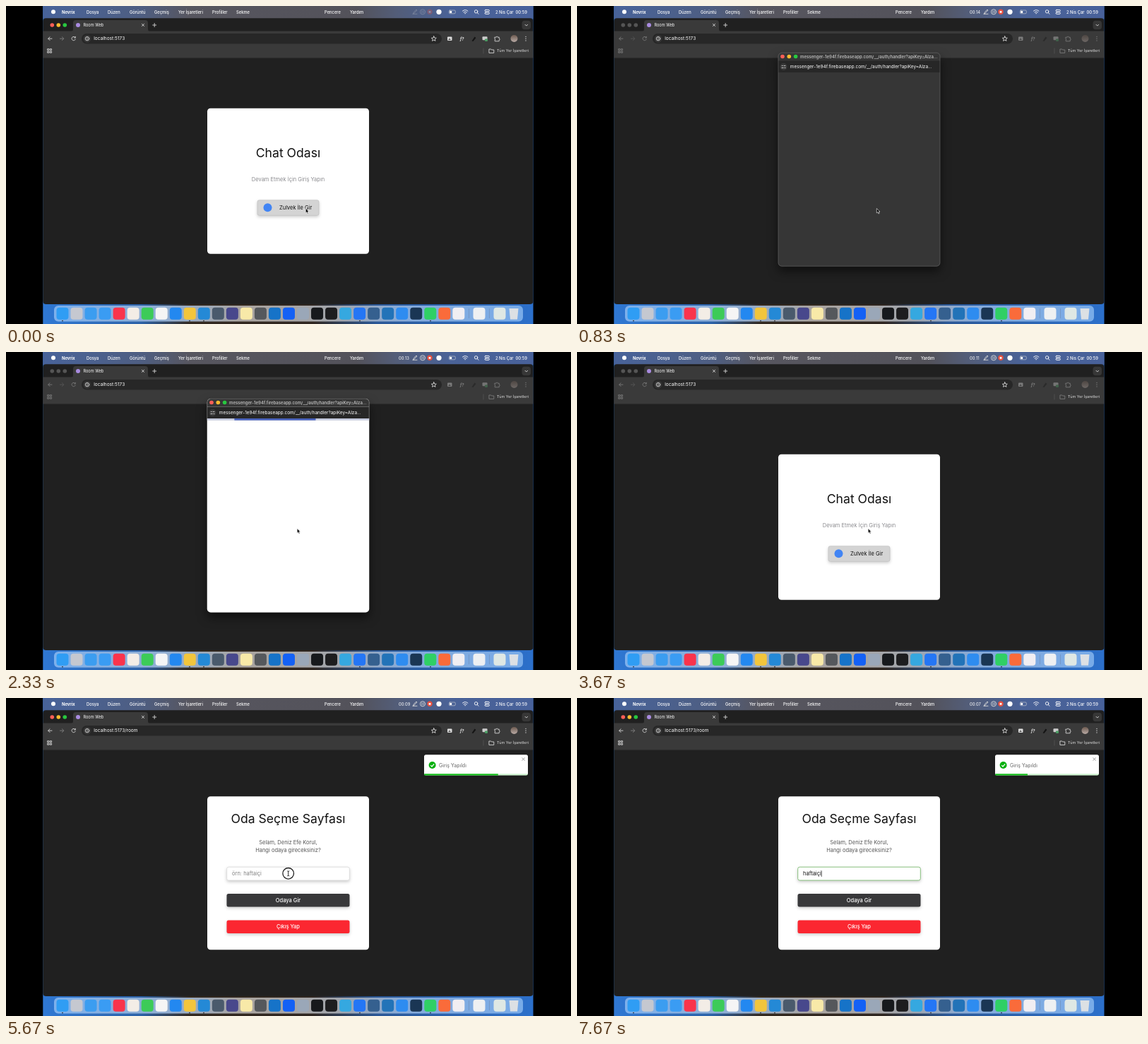
Animation of 800 by 450 pixels, one loop 8 s. Source, as an HTML page:

```html
<!DOCTYPE html>
<html lang="tr">
<head>
<meta charset="utf-8">
<title>Oda</title>
<style>
  html, body { margin: 0; width: 100%; height: 100%; overflow: hidden; background: #000; }
  svg { display: block; width: 100vw; height: 100vh; }
  text { font-family: Inter, Roboto, sans-serif; font-size: 5.8px; fill: #fff; white-space: pre; }
  .mid { text-anchor: middle; }
  .h1 { font-size: 17.6px; fill: #111; }
  .body { font-size: 7.5px; fill: #555; }
  .line { fill: none; stroke: #d6d6d6; stroke-width: .9; stroke-linecap: round; stroke-linejoin: round; }
  .card { fill: #fff; }
  .soft { filter: drop-shadow(0 2px 2px #0003); }
  .inactive .tools { opacity: .4; }
  .inactive .lights circle { fill: #555; }
</style>
</head>
<body>
<svg viewBox="0 0 800 450" preserveAspectRatio="none">
  <defs>
    <linearGradient id="bar">
      <stop offset="0" stop-color="#48639a"/><stop offset=".2" stop-color="#4e5e82"/>
      <stop offset=".3" stop-color="#57565f"/><stop offset=".64" stop-color="#53525a"/>
      <stop offset=".72" stop-color="#535d78"/>
      <stop offset=".83" stop-color="#4a6297"/><stop offset="1" stop-color="#48619a"/>
    </linearGradient>
    <linearGradient id="desk">
      <stop offset="0" stop-color="#2f78d4"/><stop offset=".2" stop-color="#2c62a8"/>
      <stop offset=".3" stop-color="#33291f"/><stop offset=".55" stop-color="#2f2620"/>
      <stop offset=".68" stop-color="#2a5796"/><stop offset="1" stop-color="#2c70cb"/>
    </linearGradient>
    <linearGradient id="dockFill">
      <stop offset="0" stop-color="#7db0ec"/><stop offset=".25" stop-color="#93aed0"/>
      <stop offset=".4" stop-color="#aaa49f"/><stop offset=".6" stop-color="#a2a5ab"/>
      <stop offset=".75" stop-color="#86abdb"/><stop offset="1" stop-color="#78abe8"/>
    </linearGradient>
    <linearGradient id="face" x2="0" y2="1">
      <stop offset="0" stop-color="#6d5a50"/><stop offset="1" stop-color="#b9aaa5"/>
    </linearGradient>
    <clipPath id="screen"><rect x="52.3" width="694.2" height="450"/></clipPath>
    <clipPath id="popClip"><rect x="284.800" y="66" width="229.400" height="302.400" rx="5"/></clipPath>
  </defs>

  <g clip-path="url(#screen)">
    <rect x="52" width="695" height="450" fill="url(#desk)"/>
    <rect x="52" width="695" height="18" fill="url(#bar)"/>
    <g id="menu"><circle cx="67" cy="8.3" r="3" fill="#fff"/></g>

    <!-- status icons -->
    <g id="recorder">
      <path class="line" d="M576.5 11l1-2.5 3.5-3.5 1 1-3.5 3.5zM576 11.3h6"/>
      <circle class="line" cx="590" cy="8.3" r="3.6"/><path class="line" d="M588.9 6.8v3M591.1 6.8v3"/>
      <circle cx="600" cy="8.3" r="3.7" fill="#e8503f"/><rect x="598.6" y="6.9" width="2.8" height="2.8" rx=".5" fill="#fff"/>
    </g>
    <text id="timer" x="556" y="10.7"></text>
    <circle cx="613" cy="8.3" r="3.6" fill="#fff"/>
    <rect class="line" x="627.3" y="6" width="9" height="4.8" rx="1.4" style="stroke-width:.6"/>
    <rect x="628.2" y="6.9" width="3" height="3" rx=".6" fill="#fff"/>
    <path class="line" style="stroke:#fff" d="M646.5 7.1q3.7-3.2 7.4 0M648 8.9q2.2-1.8 4.4 0M649.7 10.6h1"/>
    <g class="line" style="stroke:#fff"><circle cx="665.6" cy="7.8" r="2.2"/><path d="M667.3 9.5l1.8 1.8"/>
      <rect x="678" y="5.4" width="6.4" height="2.4" rx="1.2"/><rect x="678" y="9" width="6.4" height="2.4" rx="1.2"/></g>

    <!-- browser window -->
    <g id="browser">
      <path d="M52 22q0-4.700 4.700-4.700H742q4.700 0 4.700 4.700V417q0 5-5 5H57q-5 0-5-5z" fill="#202020"/>
      <path d="M92 36q3 0 3-3v-9q0-4 4-4h98q4 0 4 4v9q0 3 3 3z" fill="#3a3a3a"/>
      <rect x="52" y="35.5" width="695" height="37.2" fill="#3a3a3a"/>
      <path d="M52 73H747" stroke="#4a4a4a" stroke-width=".6"/>
      <g class="lights"><circle cx="65.3" cy="27" r="2.8" fill="#ff5f57"/><circle cx="74.3" cy="27" r="2.8" fill="#febc2e"/><circle cx="83.3" cy="27" r="2.8" fill="#28c840"/></g>
      <circle cx="102" cy="27" r="3" fill="#a98be0"/>
      <text x="109.5" y="29" style="font-size:5.6px">Room Web</text>
      <path class="line" d="M192.4 25.3l3.2 3.2m0-3.2l-3.2 3.2M207.7 27h5m-2.5-2.5v5"/>
      <rect x="730.5" y="20.7" width="12.5" height="12.5" rx="4" fill="#373737"/>
      <path class="line" d="M735 26.3l1.8 1.8 1.8-1.8"/>
      <rect x="107" y="39" width="510" height="14.5" rx="7.2" fill="#272727"/>
      <circle cx="115" cy="46.2" r="5.3" fill="#383838"/>
      <g class="line"><circle cx="115" cy="46.2" r="2.7"/><path d="M115 46v1.2M115 44.7v.1"/></g>
      <text id="url" x="124.2" y="48.4" style="font-size:6.55px"></text>
      <path class="line" d="M605.8 42.8l1 2.3 2.5.2-1.9 1.7.6 2.4-2.2-1.3-2.2 1.3.6-2.4-1.9-1.7 2.5-.2z"/>
      <g class="tools">
        <path class="line" d="M65 46.2h-5.2m2.3-2.4l-2.4 2.4 2.4 2.4M98 44.5a2.7 2.7 0 1 0 .3 2.6M98.3 43.3v1.7h-1.7"/>
        <path class="line" style="stroke:#808080" d="M76.5 46.2h5.2m-2.3-2.4l2.4 2.4-2.4 2.4"/>
        <rect x="625" y="43.5" width="6.5" height="5.5" rx="1" fill="#ddd"/><path d="M626 48l2-2.5 2 2.5z" fill="#555"/>
        <text x="643" y="48.5" style="font-style:italic;font-weight:600">f?</text>
        <path d="M659.5 49.5l4-6 2 1.5-4 5z" fill="#151515"/>
        <rect x="674.5" y="43.3" width="7" height="5" rx="1" fill="#ccc"/><rect x="678" y="46.5" width="4" height="3.5" rx="1" fill="#4a9b62"/>
        <path class="line" d="M692.2 44.2h2a1 1 0 0 1 2 0h2v1.9a1 1 0 0 1 0 2v1.7h-6v-1.9a1 1 0 0 0 0-1.7z"/>
        <circle cx="719.5" cy="46" r="5" fill="url(#face)"/>
        <path d="M736 43.5v.1M736 46.2v.1M736 48.9v.1" stroke="#ddd" stroke-width="1.3" stroke-linecap="round"/>
        <path class="line" d="M59 60.7h2v2h-2zM62.6 60.7h2v2h-2zM59 64.2h2v2h-2zM62.6 64.2h2v2h-2zM684.3 61h2.4l.9 1h3.2v4.4h-6.5z"/>
      </g>
      <path d="M676 59.5v8" stroke="#5a5a5a" stroke-width=".7"/>
      <text x="695" y="65.2" style="font-size:5.45px;fill:#ddd">Tüm Yer İşaretleri</text>
    </g>

    <g id="login">
      <rect class="card" x="285" y="144.7" width="229" height="206" rx="4.5"/>
      <text class="h1 mid" x="399.5" y="214">Chat Odası</text>
      <text class="body mid" x="399.5" y="248.3" style="fill:#8b8b8f">Devam Etmek İçin Giriş Yapın</text>
      <rect class="soft" x="356" y="274.7" width="87" height="21.6" rx="2.5" fill="#d4d4d4" stroke="#bdbdbd" stroke-width=".6"/>
      <circle cx="370.5" cy="285.3" r="6" fill="#4285f4"/>
      <text class="body" x="387" y="288" style="fill:#111">Zulvek İle Gir</text>
    </g>

    <g id="room">
      <rect class="card" x="285" y="139.2" width="229" height="217" rx="4.5"/>
      <text class="h1 mid" x="399.5" y="177">Oda Seçme Sayfası</text>
      <text class="body mid" x="399.5" y="206.5">Selam, Deniz Efe Korul,</text>
      <text class="body mid" x="399.5" y="217.6">Hangi odaya gireceksiniz?</text>
      <rect id="field" class="soft" x="312.7" y="239.2" width="173.6" height="18.8" rx="2.6" fill="#fff" stroke-width=".9"/>
      <text id="entry" class="body" x="320" y="251.2"></text>
      <path id="caret" d="M0 244.3v8.6" stroke="#111" stroke-width=".7"/>
      <rect class="soft" x="312.5" y="277" width="174" height="18.5" rx="2.5" fill="#38383a"/>
      <text class="body mid" x="399.5" y="288.9" style="fill:#fff;font-weight:500">Odaya Gir</text>
      <rect class="soft" x="312.5" y="314.5" width="174" height="18.5" rx="2.5" fill="#fb2731"/>
      <text class="body mid" x="399.5" y="326.4" style="fill:#fff;font-weight:500">Çıkış Yap</text>
    </g>

    <g id="toast">
      <rect class="soft" x="592" y="80.2" width="147" height="29.3" rx="2.7" fill="#fff"/>
      <circle cx="603.6" cy="95" r="5" fill="#07b00f"/>
      <path d="M601.2 95.2l1.8 1.8 3.2-3.7" fill="none" stroke="#fff" stroke-width="1.2"/>
      <text x="613" y="97.5" style="font-size:7px;fill:#666">Giriş Yapıldı</text>
      <path d="M730.5 84.5l4 4m0-4l-4 4" stroke="#888" stroke-width=".9"/>
      <rect x="592.5" y="107.3" width="146" height="2.2" fill="#07bc0c" opacity=".2"/>
      <rect id="life" x="592.3" y="107.3" height="2.2" fill="#14bc1a"/>
    </g>

    <g id="popup" style="filter:drop-shadow(0 7px 7px #0008)">
      <g clip-path="url(#popClip)">
        <rect id="popBody" x="284" y="66" width="231" height="303"/>
        <rect x="284" y="66" width="231" height="11.5" fill="#363636"/>
        <rect x="284" y="77.5" width="231" height="16.5" fill="#272727"/>
        <circle cx="291" cy="71.5" r="2.8" fill="#ff5f57"/><circle cx="300.3" cy="71.5" r="2.8" fill="#febc2e"/><circle cx="309.6" cy="71.5" r="2.8" fill="#28c840"/>
        <text x="316" y="73.6" style="font-weight:600;font-size:6px;fill:#bbb">messenger-1e94f.firebaseapp.com/__/auth/handler?apiKey=AIza...</text>
        <circle cx="292.5" cy="86" r="5" fill="#3a3a3a"/>
        <path class="line" d="M290.2 84.6h1m1.8 0h2M290 87.5h2.2m1.8 0h1"/>
        <text x="301.8" y="88.2" style="font-size:6.42px">messenger-1e94f.firebaseapp.com/__/auth/handler?apiKey=AIza...</text>
        <g id="loading"><rect x="284" y="94" width="231" height="2.7" fill="#c3c8dc"/><rect id="loader" y="94" height="2.7" fill="#4a63bd"/></g>
      </g>
      <rect x="285" y="66.200" width="229" height="302" rx="5" fill="none" stroke="#fff" stroke-opacity=".28" stroke-width=".6"/>
    </g>

    <g id="dock"><rect x="68" y="424" width="664" height="22.5" rx="6" fill="url(#dockFill)"/></g>

    <path id="arrow" d="M0 0v6.4l1.5-1.3 1.1 2.4 1.2-.5-1.1-2.4h2z" fill="#000" stroke="#fff" stroke-width=".6"/>
    <g id="beam">
      <circle id="ring" r="7.8" fill="#fff" stroke="#222" stroke-width="1.3"/>
      <path d="M-1.5-3.5q1.5 0 1.5 1v5q0 1-1.5 1M1.5-3.5q-1.5 0-1.5 1M0 2.5q0 1 1.5 1" fill="none" stroke="#111" stroke-width=".9"/>
    </g>
  </g>
</svg>
<script>
const $ = id => document.getElementById(id);
const set = (el, attrs) => { for (const key in attrs) el.setAttribute(key, attrs[key]); };
const add = (parent, name, attrs, text = '') => {
  const el = document.createElementNS('http://www.w3.org/2000/svg', name);
  set(el, attrs);
  el.textContent = text;
  parent.append(el);
};
const show = (id, on) => { $(id).style.display = on ? '' : 'none'; };
const lerp = (a, b, p) => a + (b - a) * Math.min(1, Math.max(0, p));

const menu = { 79: 'Nevrix', 114: 'Dosya', 144: 'Düzen', 175: 'Görüntü', 210: 'Geçmiş', 244: 'Yer İşaretleri',
  292: 'Profiller', 326: 'Sekme', 451: 'Pencere', 487: 'Yardım', 693: '2 Nis Çar  00:59' };
for (const x in menu) add($('menu'), 'text', { x, y: 10.7, 'font-weight': x < 100 ? 700 : 450 }, menu[x]);

const dockColors = ('#2f9df4 #c5c8d0 #3b9df0 #3a9cf3 #f9344c #f3ede6 #3ccb58 #f5f5f5 #2388f0 #f2c53c #2489d6 #4a5a6c ' +
  '#48488c #f8e9a8 #55585c #1673c8 #1461f5 #9aa7b8 #17191c #1d1d1f #35a8e0 #2476f5 #35608f #2273b8 #2e8cf0 #1a3654 ' +
  '#2fd065 #fa6b3a #f1eef2').split(' ');
const tile = (cx, fill) => add($('dock'), 'rect', { x: cx - 8.5, y: 426.7, width: 17, height: 17, rx: 4, fill });
dockColors.forEach((fill, i) => tile(80 + i * 20.03, fill));
tile(670, '#eef0f2');
tile(699, '#dfe8e4');
add($('dock'), 'path', { d: 'M712.5 428h13l-1.5 15.5h-10z', fill: '#dce0e4' });
for (const x of [655.5, 684.5]) add($('dock'), 'path', { d: `M${x} 428v14`, stroke: '#6f8cb5', 'stroke-width': .6 });
for (const cx of [80, 260, 280, 501, 601]) add($('dock'), 'circle', { cx, cy: 445.5, r: .8, fill: '#111' });

// Toast entry: slides in from the right and settles with a small bounce.
function bounce(p) {
  const stops = [[0, 1380], [.6, -11.5], [.75, 4.6], [.9, -2.3], [1, 0]];
  const i = stops.findIndex(stop => p < stop[0]);
  if (i < 1) return 0;
  const [[p0, a], [p1, b]] = [stops[i - 1], stops[i]];
  return lerp(a, b, 1 - (1 - (p - p0) / (p1 - p0)) ** 3);
}

function draw(tick) {
  const s = tick / 6;
  const inRoom = tick >= 26;

  show('timer', tick >= 2);
  $('timer').textContent = '00:' + String(14 - Math.floor((tick - 3) / 6)).padStart(2, '0');
  $('recorder').style.opacity = tick < 1 ? .3 : tick < 2 ? .65 : 1;
  $('browser').classList.toggle('inactive', tick >= 3 && tick < 23);
  $('url').textContent = 'localhost:5173' + (inRoom ? '/room' : '');
  show('login', !inRoom);
  show('room', inRoom);

  const opening = tick === 4;
  const loaded = tick >= 14;
  show('popup', tick >= 4 && tick < 22);
  set($('popup'), {
    transform: opening ? 'translate(399 217) scale(.506) translate(-399.5 -217)' : '',
    opacity: opening ? .54 : 1
  });
  set($('popBody'), { fill: loaded ? '#fff' : '#363636' });
  show('loading', loaded && tick < 17);
  const run = s - 1.663;
  const left = run < 1 ? .25 * run : lerp(.25, 1, (run - 1) * 2);
  const width = run < 1 ? .75 * run : lerp(.75, 0, (run - 1) * 2);
  set($('loader'), { x: 285 + 229 * left, width: Math.max(0, 229 * width) });

  const age = s - 4.22;
  show('toast', age > 0);
  set($('toast'), { transform: `translate(${bounce(age / .7)})`, opacity: lerp(0, 1, age / .42) });
  set($('life'), { width: 147 * lerp(1, 0, age / 5) });

  const focused = tick >= 35;
  const typed = 'haftaiçi'.slice(0, tick < 38 ? 0 : tick < 41 ? tick - 37 : tick < 42 ? 3 : tick - 38);
  set($('field'), { stroke: focused ? '#7dbb72' : '#dcdcdc' });
  $('entry').textContent = typed || 'örn: haftaiçi';
  $('entry').style.fill = typed ? '#111' : '#808080';
  show('caret', focused);
  set($('caret'), { transform: `translate(${typed ? 320.4 + $('entry').getComputedTextLength() : 320})` });

  const move = lerp(0, 1, (tick - 6) / 4);
  const ease = move * move * (3 - 2 * move);
  show('arrow', !inRoom);
  set($('arrow'), { transform: `translate(${lerp(424.3, 412.2, ease)} ${lerp(286.5, 249.8, ease)})` });
  show('beam', inRoom && tick < 38);
  show('ring', tick === 34);
  set($('beam'), { transform: `translate(${lerp(410.5, 399.7, (tick - 27) / 6)} 248.3)` });
}

function play() {
  const ms = performance.now() % 8000;
  draw(Math.min(47, Math.floor((ms + 5) * 6 / 1000)));
  requestAnimationFrame(play);
}
play();
</script>
</body>
</html>
```
